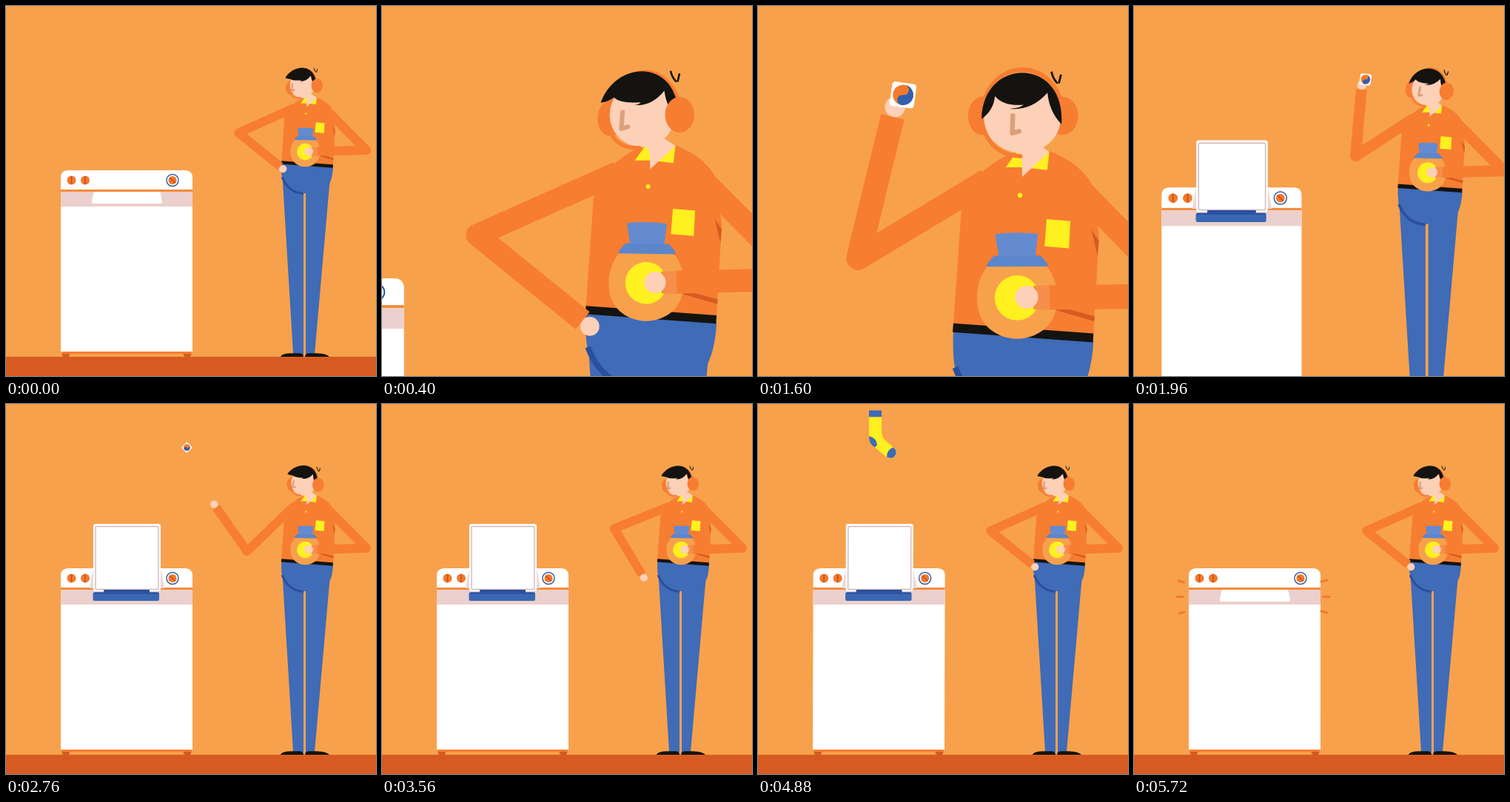
Animation, 500 px wide and 500 px high, one loop 5.76 s. Source, as an HTML page:

```html
<!DOCTYPE html>
<html lang="en">
<head>
<meta charset="utf-8">
<title>Laundry day</title>
<style>
html, body { margin: 0; width: 100%; height: 100%; overflow: hidden; background: #f8a14c; }
svg { display: block; width: 100vw; height: 100vh; }
</style>
</head>
<body>
<svg viewBox="0 0 500 500">
  <defs>
    <clipPath id="aboveDrum"><rect y="-900" width="500" height="1165"/></clipPath>
    <g id="sock">
      <path d="M0 0H17V30Q18 39 25 43L34 51Q40 57 34 63Q29 67 22 62L8 50Q0 46 0 36Z" fill="#fff020"/>
      <path d="M0 0H17V9H0ZM0 35Q10 37 11 47L8 50Q0 46 0 36ZM33 50Q24 53 24 63Q30 66 34 63Q40 57 33 50Z" fill="#3f6bb7"/>
    </g>
    <g id="knob">
      <circle r="6" fill="#f4792b"/><path d="M0 -5.500V5.500" stroke="#c24e1c" stroke-width="1.500"/>
    </g>
  </defs>
  <rect width="500" height="500" fill="#f8a14c"/>

  <g id="room">
    <rect x="-900" y="474" width="2400" height="400" fill="#d65b22"/>
    <g id="washer">
      <path d="M75 469H87L85 474H77ZM239 469H251L249 474H241Z" fill="#d65b22"/>
      <rect x="76" y="466" width="174" height="4" fill="#f77d31"/>
      <path d="M74 467V232Q74 222 84 222H242Q252 222 252 232V467Z" fill="#fff"/>
      <rect x="74" y="248" width="178" height="3" fill="#f58a3c"/>
      <rect x="74" y="251" width="178" height="20" fill="#ebd0cd"/>
      <use href="#knob" x="88.500" y="235.500"/>
      <use href="#knob" x="107" y="235.500"/>
      <circle cx="225" cy="235.500" r="8" fill="#fff" stroke="#34559c" stroke-width="1.400"/>
      <use href="#knob" transform="translate(225 235.500) rotate(-45) scale(.92)"/>
      <path id="hinges" d="M113 249L118 222V249ZM214 249L209 222V249Z" fill="#ebd8d6"/>
      <path id="lid" fill="#fff" stroke="#fff" stroke-width="6" stroke-linejoin="round"/>
      <g id="tray">
        <rect x="121" y="165.500" width="85" height="85" rx="2" fill="none" stroke="#d2b9bd" stroke-width="1.400"/>
        <rect x="132" y="251" width="62" height="5" rx="1" fill="#2a4f9e"/>
        <rect x="117.500" y="254.500" width="89.500" height="11.500" rx="2" fill="#3a67b4"/>
        <rect x="119" y="254.500" width="87" height="2" fill="#2a4f9e"/>
      </g>
    </g>
    <path id="shake" d="M60 239L68 241M58 260.500H66M61 283L68 281M253 240L261 238M256 260.500H264M253 280L261 282"
      stroke="#f4792b" stroke-width="3" stroke-linecap="round"/>
    <g clip-path="url(#aboveDrum)">
      <g id="laundry">
        <path d="M118 -110H226L219 18L178 54L139 57L139 20L124 4Z" fill="#fff"/>
        <path d="M136 20L154 34L146 36L148 55L139 57L136 50Z" fill="#2f57a6"/>
        <path d="M185 38L189 22L205 22L207 26Z" fill="#ebd0cd"/>
        <path d="M158 140H165L180 265V330H140V265Z" fill="#14130f"/>
        <path d="M128 88H154L161 155L157 232L136 264L133 330H131ZM169 88H196L188 200L186 330L172 264L159 232L163 155Z" fill="#d65b22"/>
        <path d="M134 265Q150 255 157 230L147 265ZM159 235L172 265L184 262Q166 258 159 235Z" fill="#f5833a"/>
        <path d="M127 82H155V90H128ZM168 82H196V90H168Z" fill="#f5752b"/>
        <use href="#sock" x="189" y="45"/>
        <use href="#sock" x="175" y="208"/>
        <use href="#sock" x="150" y="-400"/>
        <path d="M122.500 48V86M135.500 18V111M202.500 80V200M217.500 88V185" stroke="#d9602a" stroke-width="1.200"/>
      </g>
    </g>
  </g>

  <g id="man" stroke-linejoin="round">
    <path d="M249 471L455 485Q453 525 441 550L381 1232H346V588H337V1232H296L254 540Q247 510 249 471Z" fill="#3f6bb7"/>
    <path d="M252 524Q275 585 337 590" fill="none" stroke="#2a4f9e" stroke-width="9"/>
    <path d="M245 1240Q250 1226 290 1226H325Q337 1228 337 1240ZM343 1240Q343 1226 360 1226H390Q432 1228 440 1240Z" fill="#14130f"/>
    <path d="M300 230Q330 206 350 208L390 206Q432 222 451 252L463 330L455 474L249 460L261 290Q268 252 300 230Z" fill="#f77d31"/>
    <path d="M452 322L463 338L461 360ZM372 426L457 449L456 456L372 432Z" fill="#d65b22"/>
    <path d="M249 459L455 474L454 487L248 472Z" fill="#14130f"/>
    <path d="M325 464L347 466L346 479L324 477Z" fill="#fff020"/>
    <path d="M386 306L421 309L419 349L383 346Z" fill="#fff020"/>
    <circle cx="347" cy="271" r="3.500" fill="#fff020"/>
    <path d="M345 203L326 230H350L362 231L387 234L390 207Z" fill="#fff020"/>
    <path d="M342 195H372L390 207L350 244V222Z" fill="#fdd0b8"/>

    <g id="head">
      <path id="band" fill="none" stroke="#f77d31" stroke-width="7"/>
      <ellipse id="padLeft" rx="21" ry="28" fill="#f77d31"/>
      <ellipse id="padRight" rx="23" ry="28" fill="#f77d31"/>
      <ellipse id="face" cy="158" ry="51" fill="#fdd0b8"/>
      <path id="hair" fill="#14130f"/>
      <path id="nose" d="M0 154V180L10 177" fill="none" stroke="#d9a17b" stroke-width="7" stroke-linecap="round"/>
      <path id="tuft" d="M-6 -8Q-4 2 3 9M8 -4L5 9" fill="none" stroke="#14130f" stroke-width="3"/>
      <path id="mic" fill="none" stroke="#f77d31" stroke-width="6" stroke-linecap="round"/>
    </g>

    <path id="neck" d="M-32 -94Q0 -98 31 -94L27 -58H-26Z" fill="#648bd0"/>
    <circle id="throwHand" r="15" fill="#fdd0b8"/>
    <path id="throwSleeve" fill="none" stroke="#f77d31" stroke-width="35"/>
    <g id="jar">
      <path d="M-42 -48Q-59 -28 -59 0Q-59 40 -25 55Q0 65 25 55Q59 40 59 0Q59 -28 42 -48Z" fill="#f8a14c"/>
      <path d="M-44 -50L-34 -62H35L45 -50V-46H-44Z" fill="#5c86cb"/>
      <circle r="33" fill="#fff020"/>
    </g>
    <path id="holdSleeve" fill="none" stroke="#f77d31" stroke-width="36"/>
    <path id="cuff" fill="none" stroke="#f58f4a" stroke-width="35"/>
    <circle id="holdHand" r="17" fill="#fdd0b8"/>
    <g id="tablet">
      <rect x="-18" y="-18" width="36" height="36" rx="5" fill="#fff"/>
      <circle r="15" fill="#f4792b"/>
      <path d="M0 -15A15 15 0 0 1 0 15A7.500 7.500 0 0 1 0 0A7.500 7.500 0 0 0 0 -15" fill="#3260ae"/>
    </g>
  </g>
</svg>
<script>
const LOOP = 5760, ZOOM = 2.95, SHIFT_X = 849, SHIFT_Y = 158;
const el = {};
document.querySelectorAll('[id]').forEach(n => el[n.id] = n);

const clamp = v => Math.max(0, Math.min(1, v));
const lerp = (a, b, u) => a + (b - a) * u;
const span = (t, a, b) => clamp((t - a) / (b - a));
const smooth = u => u * u * (3 - 2 * u);
const cubic = u => u < .5 ? 4 * u ** 3 : 1 - 4 * (1 - u) ** 3;
// Rises from a to b, holds, falls from c to d.
const pulse = (t, a, b, c, d, ease = smooth) => ease(span(t, a, b)) * (1 - ease(span(t, c, d)));
const set = (n, name, v) => el[n].setAttribute(name, v);
const move = (n, x, y, extra = '') => set(n, 'transform', `translate(${x} ${y}) ${extra}`);
const show = (n, on) => set(n, 'display', on ? 'inline' : 'none');
// The figure is drawn at close-up size; this converts stage positions.
const close = (x, y) => [x * ZOOM - SHIFT_X, y * ZOOM - SHIFT_Y];
const polar = ([x, y], r, deg) => {
  const a = deg * Math.PI / 180;
  return [x + r * Math.cos(a), y + r * Math.sin(a)];
};

// Arm poses: upper arm angle, upper arm length, forearm angle.
const HIP = [156, 82, 39], DIG = [169, 75, 17], LIFT = [147, 75, -85],
  TOSS = [136, 88, -125], DROP = [158, 81, -301], REST = [156, 82, -321];
const MOVES = [[640, 1000, DIG], [1150, 1700, LIFT], [2450, 2700, TOSS], [2790, 3540, DROP], [3560, 3780, REST]];
const FOREARM = 77.5, SHOULDER = [389, 138];

function armPose(t) {
  return MOVES.reduce((pose, [from, to, next]) =>
    pose.map((v, i) => lerp(v, next[i], smooth(span(t, from, to)))), HIP);
}

function drawHead(t) {
  const front = pulse(t, 250, 700, 1250, 2500);
  const mix = (side, facing) => lerp(side, facing, front);
  const left = mix(287, 292), right = mix(391, 413), padY = mix(160, 152);
  set('hair', 'd', `M${mix(264, 296)} ${mix(129, 167)}
    C${mix(300, 288)} ${mix(70, 67)} ${mix(392, 418)} ${mix(70, 66)} ${mix(388, 412)} 166
    Q${mix(370, 394)} 148 ${mix(366, 391)} 120
    Q${mix(345, 367)} 147 ${mix(318, 334)} ${mix(141, 145)}
    Q${mix(325, 350)} 143 ${mix(328, 357)} 138
    Q${mix(296, 328)} 141 ${mix(285, 315)} ${mix(133, 124)}
    Q${mix(275, 315)} ${mix(133, 150)} ${mix(264, 296)} ${mix(129, 167)}Z`);
  move('padLeft', left, mix(168, 152));
  move('padRight', right, padY);
  // The near ear cup passes behind the cheek as the face turns to the front.
  el.head.insertBefore(el.padRight, front > .5 ? el.face : el.mic);
  set('band', 'd', `M${left} ${padY}A${(right - left) / 2} 67 0 0 1 ${right} ${padY}`);
  set('face', 'cx', mix(332, 354));
  set('face', 'rx', mix(49, 58));
  move('nose', mix(309, 346), 0, `skewX(${mix(-6, 0)})`);
  move('tuft', mix(384, 401), 97);
  set('mic', 'd', `M${mix(284, 298)} ${mix(188, 178)}Q${mix(294, 313)} 212 ${mix(326, 353)} ${mix(208, 215)}`);
  set('head', 'transform', `rotate(${6 * pulse(t, 1500, 1960, 2800, 3400)} 350 205)`);
}

function drawThrowArm(t) {
  const [upper, reach, fore] = armPose(t);
  const elbow = polar(SHOULDER, reach, upper);
  const hand = polar(elbow, FOREARM, fore);
  set('throwSleeve', 'd', `M${close(...SHOULDER)}L${close(...elbow)}L${close(...polar(elbow, FOREARM - 5, fore))}`);
  move('throwHand', ...close(...hand));

  const flight = span(t, 2640, 3300), flying = flight > 0;
  show('tablet', t > 1150 && t < 3300);
  const x = flying ? lerp(290, 163, 1 - (1 - flight) ** 2.2) : hand[0] + 4;
  const y = flying ? 32 + .00138 * (t - 2900) ** 2 : hand[1] - 6;
  move('tablet', ...close(x, y), `rotate(${flying ? 45 - (t - 2760) * .4 : 8}) scale(${flying ? .88 : 1})`);
}

function drawJar(t) {
  const tip = pulse(t, 640, 1000, 1250, 1650);
  const x = lerp(344, 313, tip), y = lerp(423, 394, tip);
  const elbowX = lerp(588, 556, tip), elbowY = lerp(417, 460, tip);
  const slope = (elbowY - y) / (elbowX - x);
  const along = dx => `${x + dx} ${y + dx * slope}`;
  for (const part of ['neck', 'jar']) move(part, x, y, `rotate(${1 - 31 * tip})`);
  move('holdHand', x + 14, y - 1);
  set('holdSleeve', 'd', `M424 252L${elbowX} ${elbowY}L${along(42)}`);
  set('cuff', 'd', `M${along(24)}L${along(48)}`);
}

function drawWasher(t) {
  const shut = t < 620 ? 1 : smooth(span(t, 5150, 5400));
  const y = lerp(165, 264, shut), wide = 2 * shut + 8 * Math.sin(Math.PI * shut);
  set('lid', 'd', `M121 ${lerp(250, 254, shut)}H206L${206 + wide} ${y}H${121 - wide}Z`);
  show('tray', shut < .15);
  show('hinges', shut < .6);
  const bounce = t > 3800 && t < 5100 ? -.45 * Math.cos((t - 4200) / 60) : 0;
  const shaking = t > 5440;
  const skew = shaking ? .3 * Math.sin((t - 5720) / 30) : bounce;
  set('washer', 'transform', `translate(0 474) skewX(${skew}) translate(0 -474)`);
  show('shake', shaking);
  show('laundry', t > 3620 && t < 5320);
  move('laundry', 0, (t - 4200) * .6);
}

function draw(t) {
  const z = pulse(t, 40, 620, 1300, 2265, cubic);
  const s = (1 + (ZOOM - 1) * z) / ZOOM;
  set('man', 'transform', `matrix(${s} 0 0 ${s} ${SHIFT_X * (s - z)} ${SHIFT_Y * (s - z)})`);
  move('room', -315 * z - 120 * z * z, 75 * z, `scale(${1 + .5 * z})`);
  drawWasher(t);
  drawHead(t);
  drawThrowArm(t);
  drawJar(t);
}

const start = performance.now();
function tick() {
  draw((performance.now() - start) % LOOP);
  requestAnimationFrame(tick);
}
tick();
</script>
</body>
</html>
```
